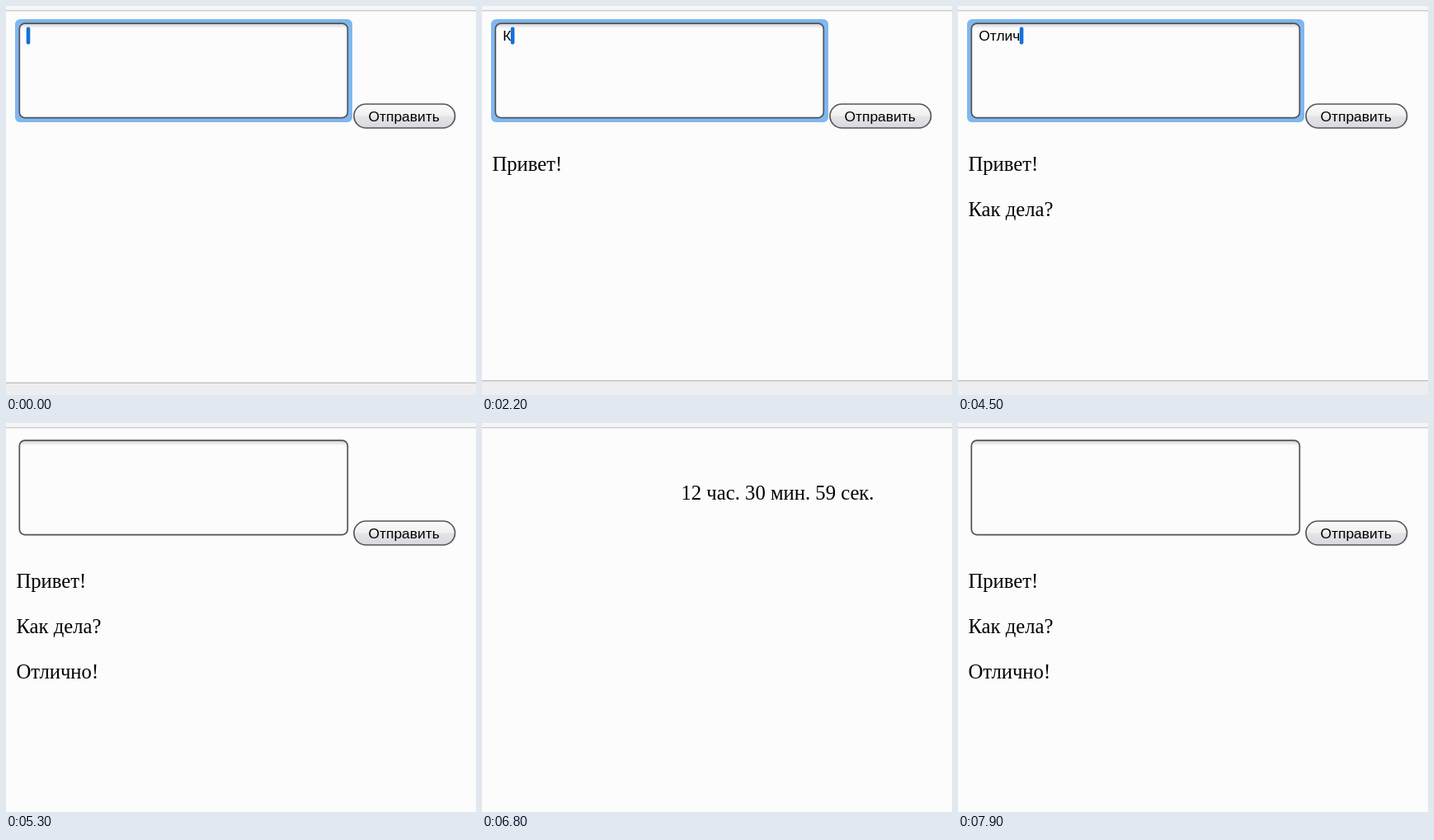
An HTML page that plays this animation: 570x472 px, repeating every 8000 ms.

```html
<!DOCTYPE html>
<html lang="ru">
<head>
<meta charset="utf-8">
<title>Чат</title>
<style>
html, body { margin: 0; width: 100%; height: 100%; overflow: hidden; background: #fcfcfc; }
#stage { position: relative; width: 570px; height: 472px; overflow: hidden; color: #000; }
svg { position: absolute; left: 0; top: 0; }
.ui { font: 17.4px "Liberation Sans", Arial, sans-serif; }
.body { font: 24.7px "Liberation Serif", Times, serif; }
</style>
</head>
<body>
<div id="stage">
<svg width="570" height="472" viewBox="0 0 570 472">
  <defs>
    <linearGradient id="face" x2="0" y2="1">
      <stop offset="0" stop-color="#fafafa"/>
      <stop offset=".48" stop-color="#f0f0f1"/>
      <stop offset=".52" stop-color="#e4e3e8"/>
      <stop offset="1" stop-color="#d9d8df"/>
    </linearGradient>
    <linearGradient id="shade" x2="0" y2="1">
      <stop offset="0" stop-color="#d2d2d2"/>
      <stop offset="1" stop-color="#fcfcfc"/>
    </linearGradient>
  </defs>
  <g id="form">
    <rect id="ring" x="11" y="16" width="409" height="125" rx="6" fill="#80b7ef"/>
    <rect x="16.3" y="21.2" width="398" height="114.4" rx="6.5" fill="#fcfcfc"/>
    <rect x="18" y="22" width="395" height="5" fill="url(#shade)"/>
    <rect x="16.3" y="21.2" width="398" height="114.4" rx="6.5" fill="none" stroke="#515357" stroke-width="1.7"/>
    <text id="typed" class="ui" x="25.3" y="42"></text>
    <rect id="caret" y="25.5" width="4.6" height="21" rx="2" fill="#1272d9"/>
    <rect x="422" y="119" width="122.5" height="29" rx="14.5" fill="url(#face)" stroke="#55565a" stroke-width="1.7"/>
    <text class="ui" x="439.5" y="139.7">Отправить</text>
    <g id="log" class="body"></g>
  </g>
  <text id="clock" class="body" y="92.5"></text>
  <rect width="570" height="5" fill="#f5f6f5"/>
  <rect y="5" width="570" height="1.3" fill="#c9c9c9"/>
  <g id="keys">
    <rect width="570" height="30" fill="#eeeef0"/>
    <rect width="570" height="1.3" fill="#bdbdbf"/>
  </g>
</svg>
</div>
<script>
const LOOP = 8000, PAGE = 616;
const $ = id => document.getElementById(id);
const ramp = (t, from, to) => {
  const p = Math.min(1, Math.max(0, (t - from) / (to - from)));
  return p * p * (3 - 2 * p);
};

// Each message: focus time, first key, time per key, send time.
const messages = [
  { text: "Привет!", focus: -200, start: 250, step: 130, send: 1350 },
  { text: "Как дела?", focus: 1800, start: 2150, step: 130, send: 3500 },
  { text: "Отлично!", focus: 3850, start: 4010, step: 110, send: 5100 }
];

messages.forEach((m, i) => {
  m.line = document.createElementNS("http://www.w3.org/2000/svg", "text");
  m.line.textContent = m.text;
  m.line.setAttribute("x", 12.4);
  m.line.setAttribute("y", 199.5 + 55 * i);
  $("log").append(m.line);
});

const show = (el, on) => el.setAttribute("visibility", on ? "visible" : "hidden");

function draw(t) {
  const active = messages.find(m => t >= m.focus && t < m.send);
  const count = active ? Math.max(0, Math.floor((t - active.start) / active.step) + 1) : 0;
  $("typed").textContent = active ? active.text.slice(0, count) : "";
  $("caret").setAttribute("x", 24.7 + $("typed").getComputedTextLength());
  show($("caret"), active);
  show($("ring"), active);
  messages.forEach(m => show(m.line, t >= m.send));

  let raised = 0;
  for (const m of messages) {
    raised += ramp(t, m.focus, m.focus + 260) - ramp(t, m.send, m.send + 180);
  }
  $("keys").setAttribute("transform", `translate(0 ${474 - 20 * raised})`);

  const shift = PAGE * (ramp(t, 5500, 6097) - ramp(t, 7250, 7750));
  $("form").setAttribute("transform", `translate(${-shift} 0)`);
  $("clock").setAttribute("x", 241.5 + PAGE - shift);
  $("clock").textContent = `12 час. 30 мин. ${t < 6500 ? 58 : 59} сек.`;
}

const origin = performance.now();
function tick() {
  draw((performance.now() - origin) % LOOP);
  requestAnimationFrame(tick);
}
tick();
</script>
</body>
</html>
```
